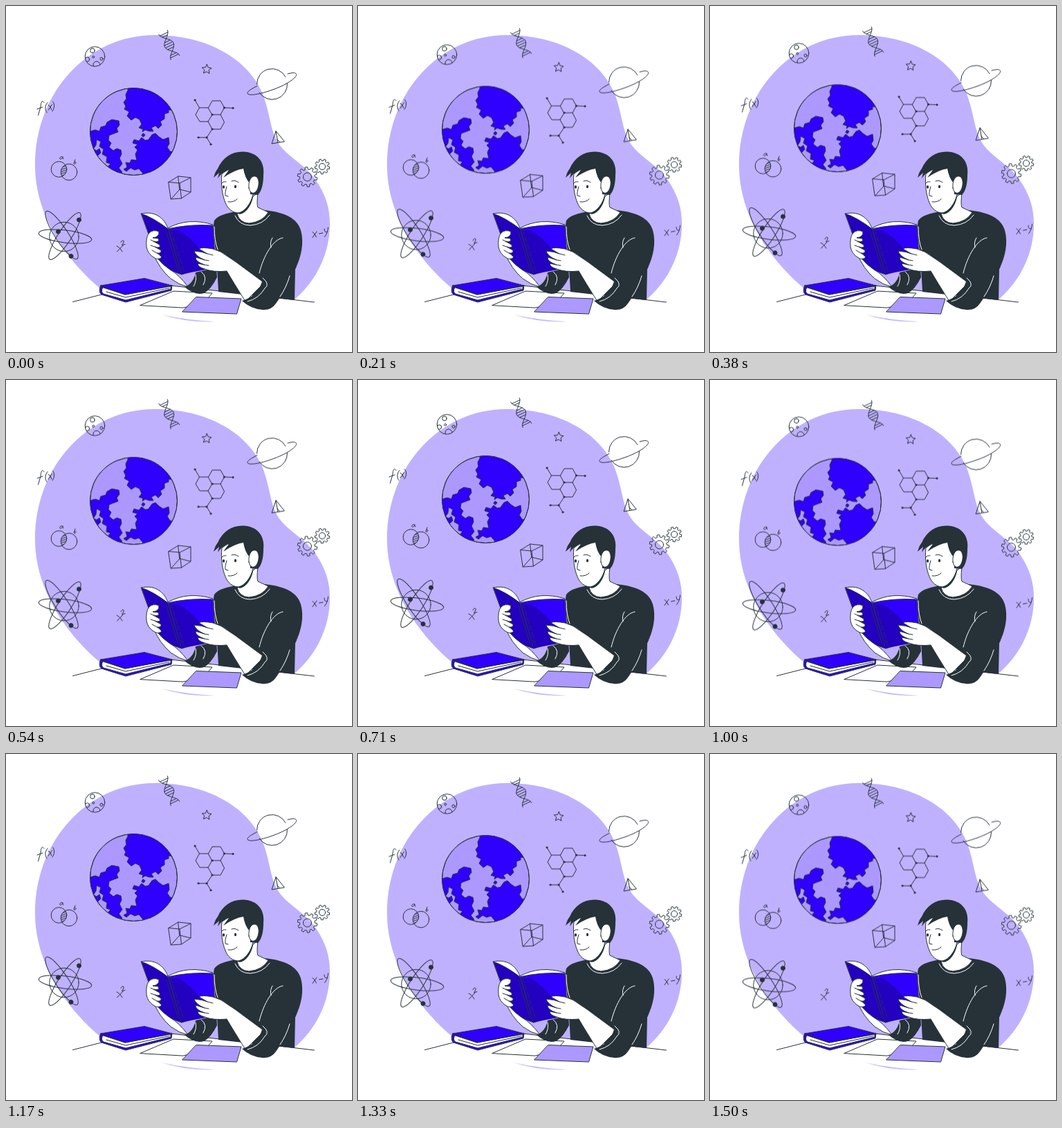
Recreate the animation shown at these times as an HTML page. Size 500x500 px, loop 1.54 s.

```html
<!DOCTYPE html>
<html lang="en">
<head>
<meta charset="utf-8">
<title>Studying</title>
<style>
  html, body { margin: 0; width: 100%; height: 100%; overflow: hidden; background: #fff; }
  svg { display: block; width: 100%; height: 100%; }
  .line { fill: none; stroke: #263238; stroke-width: 1; stroke-linecap: round; stroke-linejoin: round; }
  .white { fill: #fff; }
  .blue { fill: #3000ff; }
  .deep { fill: #2400c0; }
  .lilac { fill: #ac98ff; }
  .ink { fill: #263238; }
  .fold { fill: none; stroke: #fff; stroke-width: 1; stroke-linecap: round; }
</style>
</head>
<body>
<svg viewBox="0 0 500 500">
  <defs>
    <clipPath id="globe"><circle cx="184.5" cy="181.5" r="63"/></clipPath>
    <clipPath id="moon"><circle cx="128.5" cy="73" r="14.3"/></clipPath>
    <clipPath id="setA"><circle cx="76.5" cy="236" r="11.3"/></clipPath>
    <clipPath id="setB"><circle cx="91" cy="240" r="11.8"/></clipPath>
  </defs>

  <!-- backdrop -->
  <g fill="#c0b1ff">
    <path d="M142 413C86 368 42 302 42 230C42 125 118 42 215 42C290 42 350 76 371 127C383 159 381 183 397 203C412 221 434 231 448 252C462 273 468 292 468 315C468 358 448 398 416 425L300 411L240 404Z"/>
    <path d="M225 446Q260 454 301 456Q260 457.500 225 446Z"/>
  </g>

  <g id="float" class="line">
    <!-- globe -->
    <circle class="lilac" cx="184.5" cy="181.5" r="63"/>
    <g class="blue" clip-path="url(#globe)">
      <path d="M176 115L176 122L173 128L174 134L170 139L173 145L171 149L178 153L175 159L181 165L187 161L193 164L196 171L192 176L198 178L197 182L201 179L207 181L213 181L210 176L216 173L220 177L225 172L223 167L229 163L229 156L235 154L235 150L250 152L250 110Z"/>
      <path d="M118 182L129 179L135 181L137 175L144 173L146 168L153 164L163 166L164 172L160 177L162 182L154 185L149 187L148 194L152 198L149 204L155 209L160 206L166 208L167 214L164 220L168 228L163 234L168 240L156 243L146 234L151 228L145 226L146 218L139 214L141 207L135 203L137 196L131 193L130 201L126 207L118 200Z"/>
      <path d="M206 193L211 186L216 184L221 189L227 193L235 190L236 199L233 204L237 210L250 213L240 250L196 250L198 242L192 235L186 237L180 234L174 239L170 236L175 233L173 226L179 227L181 222L189 223L187 214L190 208L186 204L190 200L183 198L185 193L192 195L196 190L201 194Z"/>
      <path d="M196 187L198 184L201 186L199 189Z"/>
      <path d="M123 211L127 207L131 209L135 206L137 212L132 217L126 216Z"/>
    </g>
    <circle cx="184.5" cy="181.5" r="63"/>

    <!-- moon -->
    <circle cx="128.5" cy="73" r="14.3"/>
    <g clip-path="url(#moon)">
      <circle cx="125" cy="64.5" r="3.3"/><circle cx="126.2" cy="73.6" r="1.5"/>
      <circle cx="138" cy="76.3" r="2.1"/><circle cx="117.5" cy="77" r="3.2"/>
      <circle cx="131" cy="85" r="5"/>
    </g>

    <path id="dna"/>
    <path id="star"/>

    <!-- ringed planet -->
    <path d="M362.500 113A22 22 0 0 1 404 102.500M406.500 112A22 22 0 0 1 366 125"/>
    <path d="M363 115.5C354 120 348 124 349 126.5C352 131 372 126 388 120C407 113 421 103 419.5 98.5C418 95.5 413 96.5 407 98"/>

    <!-- molecule -->
    <path d="M292.5 147L298 137L310 137L315.5 147L310 157L298 157ZM292.5 147L279.5 147L274 157L280 167L292 167L298 157M292 167L298 178L310 178L315.5 168L310 157M279.5 147L273 136M315.5 147L328 147.5M298 178L290 190L278 190M290 190L296 200"/>
    <g id="atoms" class="ink"></g>

    <path d="M390 181L384 199L402 196ZM390 181L393 197.500M391.500 192.500L395.500 196.500"/>

    <g id="gears"></g>

    <!-- overlapping sets -->
    <circle cx="76.5" cy="236" r="11.3"/><circle cx="91" cy="240" r="11.8"/>
    <g clip-path="url(#setA)"><path id="hatch" clip-path="url(#setB)"/></g>
    <path d="M82 218C79 217 77 219 78 221C79 222 81 221 82 218Q81 221 83 221M100 222L98 228C101 229 103 225 99 225.5"/>

    <!-- formulas -->
    <path d="M55 139.5C52 135 50.5 139 50 146L46.500 158M45 149L53 146M60 139.500C56 144 56 150 59 154M61 143Q64 144 66 150M66.500 142.500L61 150.500M67.500 138C71 142 70 148 67 152"/>
    <path d="M160 347Q164 348 168 355M169 346L160.500 355M166 341.500C167 338 171 338 170 341Q169 344 167.500 345.500L172 344.500"/>
    <path d="M443 326.500Q446 328 448.500 334M449 326L443 334.500M452.500 329L458 328M460 322Q460 328 464 326.500M465.500 320Q465 328 460.500 333.500"/>

    <!-- wire cube -->
    <path d="M235 254.500L251 256L253.500 278L238.500 279ZM249 246L267 248L267 269L251 265ZM235 254.500L249 246M251 256L267 248M253.500 278L267 269M238.500 279L251 265"/>

    <!-- atom -->
    <circle cx="84" cy="333.500" r="21.200"/>
    <ellipse rx="38.500" ry="9" transform="translate(85.500 333) rotate(7)"/>
    <ellipse rx="41" ry="9.500" transform="translate(80.500 331) rotate(57)"/>
    <ellipse rx="40" ry="9.500" transform="translate(85 332.500) rotate(-57)"/>
    <g class="ink">
      <circle cx="105.500" cy="309" r="3"/><circle cx="75.500" cy="326" r="3"/><circle cx="94" cy="361.500" r="3"/>
    </g>
  </g>

  <!-- desk -->
  <path class="line" d="M96.500 427.500L138 417M238 404L300 411L445.500 428"/>
  <path class="line white" d="M194 432.500L242 412L298 415L285 430L256 436Z"/>
  <path class="line lilac" d="M275 420.500L340 423L333.500 445L255 442Z"/>

  <!-- closed book -->
  <g class="line">
    <path class="blue" d="M137 404C134 409 135 415 138 417L173 428L239 411L240 404Z"/>
    <path class="white" d="M140 407C137.500 410 138 414 141 416L173 425L238 409L238 405L172 417Z"/>
    <path d="M145 413L173 421L236 407.500"/>
    <path class="blue" d="M137 404L200 393.500L240 404L173 417Z"/>
    <path d="M137 404Q140 410 138 417"/>
  </g>

  <!-- far arm -->
  <path class="line white" d="M213 358Q221 379 238 394Q250 403 263 406Q250 388 237 381L225 365Z"/>
  <path class="ink" d="M258 406Q271 401 274 385L304 378L305 392Q296 410 286 415Q273 419 258 406Z"/>
  <path class="fold" d="M274 388Q276 397 271 405M282 384Q292 391 285 403"/>

  <!-- torso -->
  <path class="ink" d="M334 297C318 299 306 303 301 310C298 320 302 345 304 360L307 413L342 417L417 425L418 380C427 362 431 342 426 324C421 307 403 298 374 295Z"/>
  <path class="line white" d="M334 300Q352 292 357 275L364 270Q362 287 364 291L379 298Q371 312 351 314Q337 313 334 300Z"/>
  <path class="fold" d="M331 303Q337 317 353 317Q371 316 381 302"/>
  <path class="ink" d="M333 299Q339 304 348 295Q355 287 357 276L346 288Z"/>

  <!-- head -->
  <path class="line white" d="M312 243C310 258 313 275 317 284C320 293 328 299 336 299C345 297 354 286 357 272L360 240L335 226Z"/>
  <path class="ink" d="M300 248C303 238 304 238 306 235C313 219 326 210.500 342 210.500C364 211 374 226 372 244C372 256 370 267 364 273L353 272L352 256Q345 248 343 235Q330 237 314 248L322 237Q312 240 306 249L308 241Z"/>
  <path class="line white" d="M351 263C350 253 354 245 360 246C368 248 366 266 359 270Q353 272 351 263Z"/>
  <path class="line" d="M312 256Q314 253 318 254M326 253Q331 251 336 255M319 261Q316 270 317 274L321 275M321 283Q329 284 334 279"/>
  <ellipse class="ink" cx="314.500" cy="261.500" rx="1.600" ry="2.300"/>
  <ellipse class="ink" cx="331.500" cy="261" rx="1.600" ry="2.300"/>

  <!-- open book -->
  <g class="line">
    <path class="white" d="M196 300C210 297 226 301 234 321Q263 305 299 316L296 324L234 330Z"/>
    <path class="blue" d="M234 322Q265 315 299 317L303 378Q275 381 254 388Z"/>
    <path class="deep" d="M195.500 300Q213 306 234 322L254 388Q234 383 219 365Z"/>
  </g>
  <path class="deep" d="M236 324L249 324Q270 336 281 353Q268 368 288 381L254 387.500Z"/>
  <g class="line" stroke-width="0.8">
    <path d="M238 323L258 386" stroke-dasharray="8 3"/>
    <path d="M232 327L249 382"/>
  </g>

  <!-- far hand -->
  <g class="line">
    <path class="white" d="M221 326Q212 322 206 329Q202 335 203 348Q205 358 213 363Q220 368 225 363Q222 359 218 357Q225 358 224 353L215 348Q224 351 222 345L213 340Q223 342 220 336L212 335Q222 334 221 326Z"/>
    <path d="M213 340L209 338M215 348L209 346M218 357L211 353"/>
  </g>

  <!-- near arm -->
  <path class="line white" d="M272 354Q284 355 291 358L279 351Q282 348 299 351Q311 354 322 363L331 369L373 400L346 427Q329 400 319 383Q300 385 287 380Q277 377 277 372L287 374Q273 369 274 363L287 367Q273 361 272 354Z"/>
  <path class="line" d="M291 358L299 360M287 367L293 368M287 374L293 375"/>
  <path class="ink" d="M341 426Q364 419 370 398Q390 388 400 367L420 376Q405 410 390 430Q383 440 371 439Q354 438 341 426Z"/>
  <path class="fold" d="M400 335C386 337 372 361 366 386M385 335Q381 341 383 349M371 393Q382 402 374 408Q365 423 349 427M410 390Q405 407 396 420M301 319Q301 339 306 352"/>
</svg>

<script>
  const $ = id => document.getElementById(id);
  const toPath = pts => pts.map((p, i) => (i ? 'L' : 'M') + p.map(v => v.toFixed(2))).join('');
  const polar = (cx, cy, r, a) => [cx + r * Math.cos(a), cy + r * Math.sin(a)];
  const range = n => [...Array(n).keys()];

  function add(parent, name, attrs) {
    const el = document.createElementNS('http://www.w3.org/2000/svg', name);
    for (const key in attrs) el.setAttribute(key, attrs[key]);
    parent.append(el);
  }

  // Point on a helix strand: s runs along the axis, side is +1 or -1.
  function helix(s, side) {
    const w = 7 * side * Math.cos(2 * Math.PI * s);
    return [227 + 17.5 * s + 0.9 * w, 38 + 36.5 * s - 0.43 * w];
  }
  const strand = side => toPath(range(33).map(i => helix(i / 32, side)));
  const rungs = [0.07, 0.15, 0.36, 0.45, 0.54, 0.63, 0.86, 0.94]
    .map(s => toPath([helix(s, 1), helix(s, -1)]));
  $('dna').setAttribute('d', strand(1) + strand(-1) + rungs.join(''));

  $('star').setAttribute('d', toPath(range(10).map(i =>
    polar(290, 91.5, i % 2 ? 3.4 : 7.2, (i / 5 - 0.5) * Math.PI + 0.06))) + 'Z');

  for (const [cx, cy] of [[273, 136], [328, 147.5], [278, 190], [296, 200], [315.5, 147], [298, 157], [298, 178], [290, 190]])
    add($('atoms'), 'circle', { cx, cy, r: 1.1 });

  function gear(cx, cy, outer, root, hole, teeth) {
    const step = 2 * Math.PI / teeth;
    const pts = range(teeth).flatMap(i =>
      [[root, -0.3], [outer, -0.2], [outer, 0.2], [root, 0.3]]
        .map(([r, k]) => polar(cx, cy, r, (i + k) * step + 0.2)));
    add($('gears'), 'path', { d: toPath(pts) + 'Z' });
    add($('gears'), 'circle', { cx, cy, r: hole });
  }
  gear(435.5, 247, 14.3, 11, 6, 10);
  gear(457, 232, 10.8, 8.3, 4.6, 9);

  $('hatch').setAttribute('d', range(7).map(i => `M76 ${232 + i * 3}l16 -6`).join(''));

  // [time in ms, vertical offset]
  const LOOP = 1540;
  const steps = [[0, 0], [725, -9.15], [1465, 0.95], [LOOP, 0]];
  $('float').animate(
    steps.map(([t, y]) => ({ offset: t / LOOP, transform: `translateY(${y}px)` })),
    { duration: LOOP, iterations: Infinity });
</script>
</body>
</html>
```
